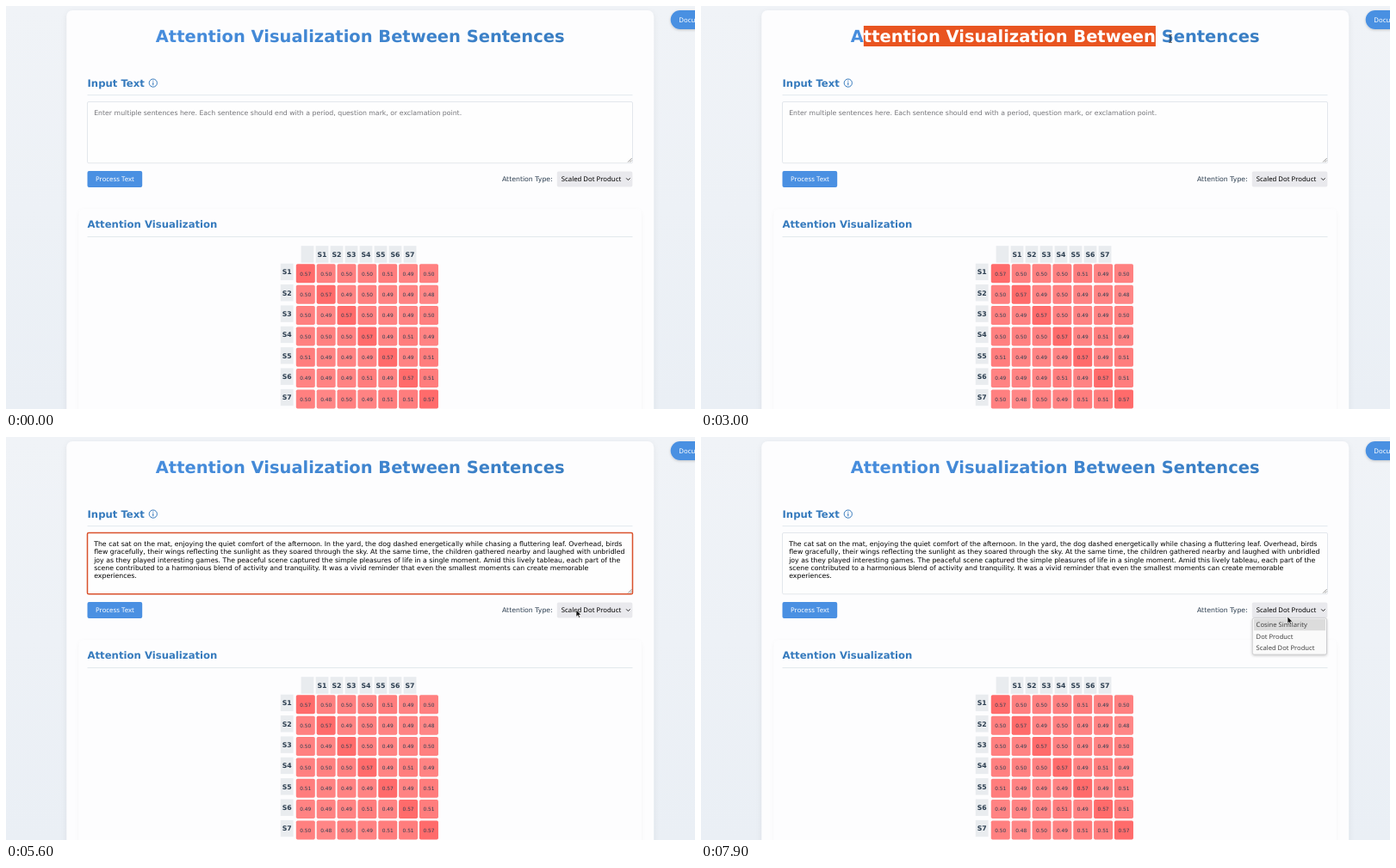
Write an HTML page that moves like this. It is 800 by 469 pixels and loops after 8 s.

```html
<!DOCTYPE html>
<html lang="en">
<head>
<meta charset="utf-8">
<title>Attention Visualization</title>
<style>
  html, body { margin: 0; width: 100%; height: 100%; overflow: hidden; background: #edf1f6; }
  svg { display: block; width: 800px; height: 469px; }
  text { font: 7.79px "DejaVu Sans", sans-serif; fill: #2c3e50; text-rendering: geometricPrecision; white-space: pre; }
  .title { font-size: 19.48px; font-weight: bold; }
  .h2 { font-size: 11.68px; font-weight: bold; fill: #357abd; }
  .rule { fill: #e1e8ed; }
  .ui { font-family: "Noto Sans", "Open Sans", sans-serif; fill: #000; }
  .light { fill: #fff; }
  .hint { fill: #75757a; }
  .typed { fill: #000; }
  .item { font-size: 7.62px; fill: #444; }
  .head { font-weight: bold; text-anchor: middle; }
  .num { font-size: 5.84px; text-anchor: middle; }
  .headbox { fill: #e9ecef; }
  .blue { fill: #4a90e2; }
</style>
</head>
<body>
<svg viewBox="0 0 800 469">
  <defs>
    <linearGradient id="page" x2="0" y2="1">
      <stop stop-color="#f0f3f7"/><stop offset="1" stop-color="#eaeff5"/>
    </linearGradient>
    <linearGradient id="ink" gradientUnits="userSpaceOnUse" x1="85" x2="738" y1="0" y2="0">
      <stop stop-color="#4a90e2"/><stop offset="1" stop-color="#357abd"/>
    </linearGradient>
    <filter id="soft" x="-20%" y="-20%" width="140%" height="140%">
      <feDropShadow dx="0" dy="2" stdDeviation="3" flood-opacity=".07"/>
    </filter>
    <filter id="lift" x="-20%" y="-20%" width="140%" height="150%">
      <feDropShadow dx="0" dy="1" stdDeviation="1.5" flood-opacity=".2"/>
    </filter>
    <clipPath id="selClip"><rect id="selClipBox" y="23" height="24"/></clipPath>
  </defs>

  <rect width="800" height="469" fill="url(#page)"/>
  <rect x="70.3" y="4.9" width="681.8" height="520" rx="7" fill="#fdfdfe" filter="url(#soft)"/>
  <rect x="84.9" y="236" width="652.6" height="260" rx="5" fill="#fdfdfe" filter="url(#soft)" opacity=".6"/>

  <g filter="url(#lift)"><rect class="blue" x="771.7" y="5" width="80" height="22" rx="11"/></g>
  <text class="ui light" x="781.3" y="18.6">Documentation</text>

  <text class="title" id="title" x="173.8" y="42" fill="url(#ink)" style="fill:url(#ink)">Attention Visualization Between Sentences</text>
  <g id="selection" clip-path="url(#selClip)">
    <rect x="170" y="23" width="482" height="24" fill="#e95420"/>
    <text class="title light" x="173.8" y="42">Attention Visualization Between Sentences</text>
  </g>

  <text class="h2" x="94.5" y="93.6">Input Text</text>
  <g fill="none" stroke="#357abd">
    <circle cx="170.8" cy="89.6" r="4.6" stroke-width="1"/>
    <path d="M170.8 88.8V92.2M170.8 86.8V87.8" stroke-width="1.1"/>
  </g>
  <rect class="rule" x="94.5" y="103.2" width="633" height="1"/>

  <rect id="area" x="94.5" y="111.5" width="633" height="71.3" rx="1.5" fill="#fefefe"/>
  <path d="M722.2 181.6L726.6 177.2M724.6 181.6L726.6 179.6" stroke="#777" stroke-width=".8"/>
  <text class="hint" id="hint" x="102.2" y="127">Enter multiple sentences here. Each sentence should end with a period, question mark, or exclamation point.</text>
  <g id="typed"></g>
  <rect id="caret" y="119.5" width=".7" height="9.2"/>

  <rect class="blue" x="94.5" y="192" width="63.7" height="19" rx="2"/>
  <text class="ui light" x="103.9" y="204.4">Process Text</text>
  <text x="575.9" y="204.4">Attention Type:</text>
  <rect x="639.8" y="192.4" width="87.6" height="18.2" rx="2" fill="#e9e9ed"/>
  <text class="ui" x="644.8" y="204.4">Scaled Dot Product</text>
  <path d="M720.2 200.4l2.2 2.2l2.2-2.2" fill="none" stroke="#222" stroke-width="1"/>

  <text class="h2" x="94.5" y="258.3">Attention Visualization</text>
  <rect class="rule" x="94.5" y="268.1" width="633" height="1"/>
  <g id="grid"></g>

  <g id="menu">
    <rect x="640.2" y="210.8" width="86.4" height="42.4" rx="2" fill="#fafafa" stroke="#bfbfc2" stroke-width=".8" filter="url(#lift)"/>
    <rect id="hover" x="642" width="83" height="13.2" fill="#dcdcdc"/>
  </g>

  <path id="arrow" d="M0 0V8.2L1.9 6.5L3.2 9.3L4.6 8.7L3.3 6H5.9Z" fill="#111" stroke="#fff" stroke-width=".6"/>
  <path id="beam" d="M-1.7-4.4H-.5L0-4L.5-4.4H1.7M0-4V4M-1.7 4.4H-.5L0 4L.5 4.4H1.7" fill="none" stroke="#222" stroke-width=".9"/>
</svg>
<script>
const LOOP = 8000, STEP = 100;
const $ = id => document.getElementById(id);

function add(parent, tag, attrs, label) {
  const el = document.createElementNS('http://www.w3.org/2000/svg', tag);
  for (const name in attrs) el.setAttribute(name, attrs[name]);
  if (label) el.textContent = label;
  return parent.appendChild(el);
}

const lines = [
  'The cat sat on the mat, enjoying the quiet comfort of the afternoon. In the yard, the dog dashed energetically while chasing a fluttering leaf. Overhead, birds',
  'flew gracefully, their wings reflecting the sunlight as they soared through the sky. At the same time, the children gathered nearby and laughed with unbridled',
  'joy as they played interesting games. The peaceful scene captured the simple pleasures of life in a single moment. Amid this lively tableau, each part of the',
  'scene contributed to a harmonious blend of activity and tranquility. It was a vivid reminder that even the smallest moments can create memorable',
  'experiences.'
];
const typedLines = lines.map((line, i) =>
  add($('typed'), 'text', { class: 'typed', x: 102.2, y: 127 + i * 9.25 }, line));

['Cosine Similarity', 'Dot Product', 'Scaled Dot Product'].forEach((label, i) =>
  add($('menu'), 'text', { class: 'ui item', x: 644.6, y: 221.3 + i * 13.2 }, label));

// Attention scores in hundredths, one row per sentence
const scores = [
  '57 50 50 50 51 49 50', '50 57 49 50 49 49 48', '50 49 57 50 49 49 50',
  '50 50 50 57 49 51 49', '51 49 49 49 57 49 51', '49 49 49 51 49 57 51',
  '50 48 50 49 51 51 57'
];
const grid = $('grid');
add(grid, 'rect', { class: 'headbox', x: 342.6, y: 279.2, width: 14.8, height: 19.6 });
scores.forEach((row, r) => {
  const colX = 367 + r * 17, rowY = 309.3 + r * 24.36;
  add(grid, 'rect', { class: 'headbox', x: colX - 7.4, y: 279.2, width: 14.8, height: 19.6 });
  add(grid, 'text', { class: 'head', x: colX, y: 292.2 }, 'S' + (r + 1));
  add(grid, 'rect', { class: 'headbox', x: 318.8, y: rowY - 9.6, width: 14.8, height: 19.4 });
  add(grid, 'text', { class: 'head', x: 326.2, y: rowY + 2.9 }, 'S' + (r + 1));
  row.split(' ').forEach((score, c) => {
    const x = 347.8 + c * 23.86, y = 311.3 + r * 24.36, tone = 128 - (score - 50) * 3;
    add(grid, 'rect', { x: x - 11, y: y - 11, width: 22, height: 22, rx: 1.8, fill: `rgb(255,${tone},${tone})` });
    add(grid, 'text', { class: 'num', x, y: y + 2.2 }, '0.' + score);
  });
});

// Pointer path: time, x, y
const path = [
  [500, 797, 9], [900, 787, 16], [1400, 430, 130], [1500, 420, 128], [1800, 257, 60],
  [2100, 190, 36], [2200, 188, 36], [2900, 528, 37], [3000, 545, 38], [3200, 615, 37],
  [3500, 600, 38], [4100, 312, 126.6], [4900, 312, 127], [5100, 340, 135], [5600, 662, 201],
  [6000, 662, 202], [6300, 668, 214], [6900, 673, 230], [7300, 676, 241], [7500, 677, 240],
  [7900, 681, 209]
];
function pointer(t) {
  const i = path.findIndex(p => p[0] >= t);
  if (i < 1) return path[0].slice(1);
  const [a, b] = [path[i - 1], path[i]], k = (t - a[0]) / (b[0] - a[0]);
  return [1, 2].map(n => a[n] + (b[n] - a[n]) * k);
}

const title = $('title');
const edges = [...title.textContent].map((_, i) => title.getStartPositionOfChar(i).x);
edges.push(title.getEndPositionOfChar(edges.length - 1).x);
const snap = x => edges.reduce((best, e) => Math.abs(e - x) < Math.abs(best - x) ? e : best);

const within = (t, from, to) => t >= from && t < to;
const show = (id, on) => $(id).setAttribute('visibility', on ? 'visible' : 'hidden');

function draw(t) {
  const [x, y] = pointer(t);
  const overTitle = x > 174 && x < 648 && y > 22 && y < 48;
  const overArea = x > 94 && x < 728 && y > 111 && y < 183;
  const beam = overTitle || overArea;
  for (const id of ['arrow', 'beam']) $(id).setAttribute('transform', `translate(${x} ${y})`);
  show('arrow', t >= 500 && !beam);
  show('beam', t >= 500 && beam);

  // The highlight trails the pointer by one step
  const selecting = within(t, 2300, 3400);
  show('selection', selecting);
  if (selecting) {
    const end = snap(pointer(Math.min(t, 3200) - STEP)[0]);
    $('selClipBox').setAttribute('x', edges[1]);
    $('selClipBox').setAttribute('width', Math.max(0, end - edges[1]));
  }

  const focused = within(t, 1400, 2100) || within(t, 4300, 6000);
  $('area').setAttribute('stroke', focused ? '#d9512c' : '#e0e5ea');
  $('area').setAttribute('stroke-width', focused ? 1.5 : 0.9);

  const filled = t >= 4900;
  show('hint', !filled);
  show('typed', filled);
  const since = t < 4300 ? t - 1400 : t < 4900 ? t - 4300 : t - 4900;
  show('caret', focused && since % 1000 < 500);
  const last = typedLines[typedLines.length - 1];
  $('caret').setAttribute('x', filled ? 102.2 + last.getComputedTextLength() : 102);
  $('caret').setAttribute('transform', `translate(0 ${filled ? 37 : 0})`);

  show('menu', t >= 6000);
  const item = t < 6300 ? 2 : y < 225 ? 0 : y < 238 ? 1 : 2;
  $('hover').setAttribute('y', 212 + item * 13.2);
}

const start = performance.now();
function tick() {
  const t = (performance.now() - start) % LOOP;
  draw(Math.floor(t / STEP) * STEP);
  requestAnimationFrame(tick);
}
tick();
</script>
</body>
</html>
```
